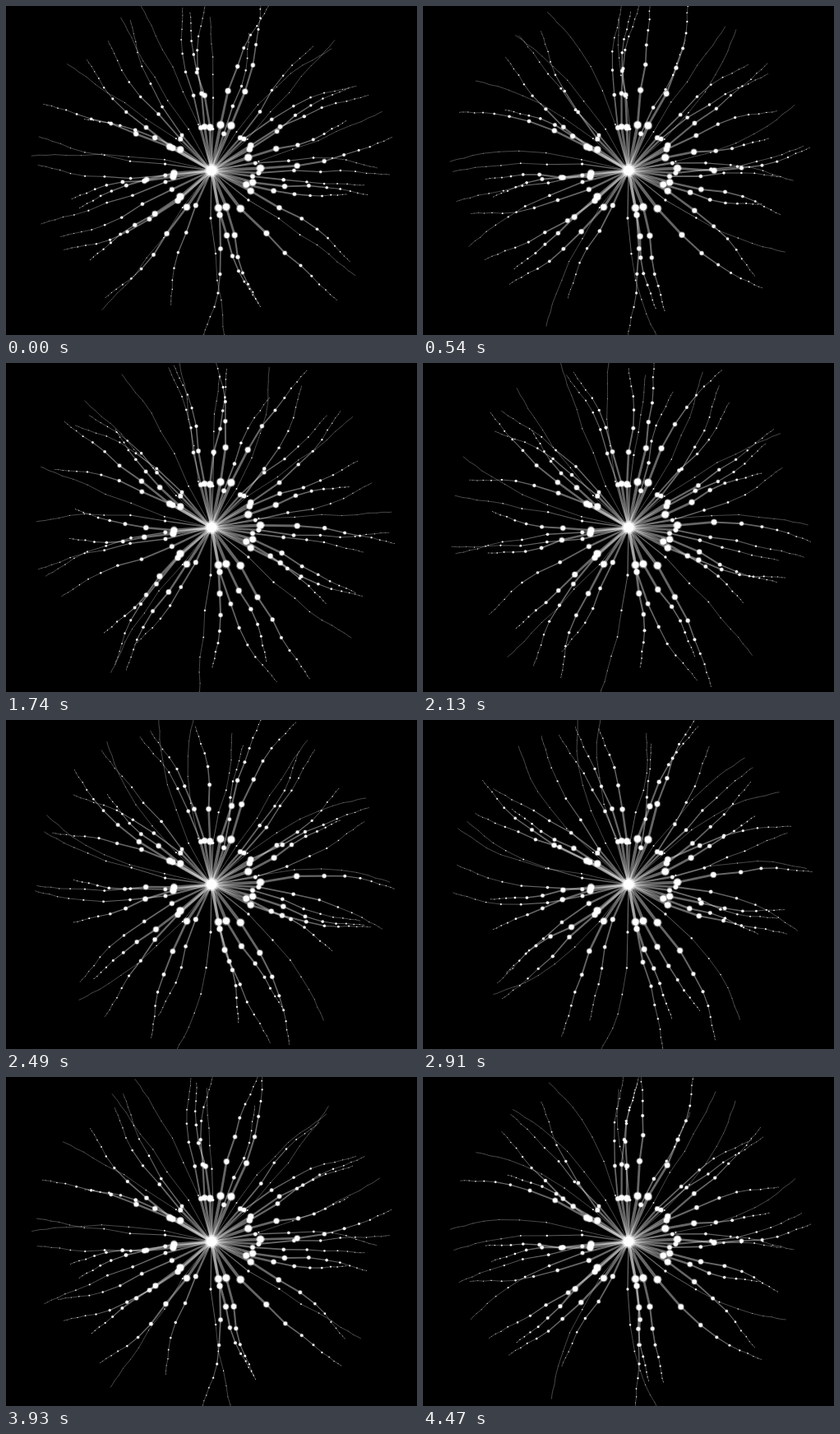
An HTML page with a canvas for the animation above (4500 ms loop, 500 px wide and 400 px high).

```html
<!DOCTYPE html>
<html>
<head>
<meta charset="utf-8">
<style>
  html, body { margin: 0; width: 100%; height: 100%; overflow: hidden; background: #000; }
  canvas { display: block; }
</style>
</head>
<body>
<canvas id="stage" width="500" height="400"></canvas>
<script>
const ctx = document.getElementById('stage').getContext('2d');
const LOOP = 4500, STEP = 30, SHRINK = 0.75, SWAY = 0.16, PHASE = -3.2;

// Strands grouped by root size: direction in degrees, first segment length.
// The length also sets the phase of the sway.
const groups = [
  { size: 5, strands: [[-66.4, 59.6], [-78.7, 56.5], [68, 47.8], [79.5, 46.4], [52.7, 58.2],
    [140, 49.6], [-2.6, 59.6], [-19.4, 47.4]] },
  { size: 4.5, strands: [[-92, 52.5], [22, 45.6], [16, 52.2], [171, 47.2], [176, 45.7],
    [209.6, 58.5], [214, 45.6], [124, 53.8], [27.5, 53.8]] },
  { size: 4, strands: [[-99, 53.9], [-29, 53], [-32.5, 56.6], [138, 55], [79.5, 54.9], [210, 54.5]] },
  { size: 3.2, strands: [[-71.4, 47.1], [-48.7, 53], [-44.2, 55.1], [3, 57.5], [8, 50.5],
    [114.3, 46.6], [154.4, 53.4], [225.5, 53.8], [-104, 53.6]] },
  { size: 2.6, strands: [[-9.5, 54.1], [166, 57.7], [174, 56.5], [230, 56]] },
  { size: 1.7, strands: [[38.7, 57.6], [91, 58], [188, 57], [-88, 50.5]] },
  { size: 1, strands: [[193, 58.6], [222, 58], [241, 57.5], [254, 58.3], [-57, 56],
    [-41, 58], [-11, 58.5], [128, 57.3]] }
];

function dot(x, y, r) {
  for (const [scale, alpha] of [[1.08, 0.4], [0.82, 1]]) {
    ctx.fillStyle = `rgba(255,255,255,${alpha})`;
    ctx.beginPath();
    ctx.arc(x, y, r * scale, 0, 2 * Math.PI);
    ctx.fill();
  }
}

function strand(angle, length, size, time) {
  let x = 250, y = 200;
  while (length > 4) {
    const nextX = x + length * Math.cos(angle);
    const nextY = y + length * Math.sin(angle);
    ctx.lineWidth = Math.max(0.7, size * 0.75);
    ctx.beginPath();
    ctx.moveTo(x, y);
    ctx.lineTo(nextX, nextY);
    ctx.stroke();
    dot(nextX, nextY, size);
    x = nextX;
    y = nextY;
    angle += SWAY * Math.sin(time + length + PHASE);
    length *= SHRINK;
    size *= SHRINK;
  }
}

function draw(now) {
  const time = Math.floor(now % LOOP / STEP) * STEP / 600;
  ctx.fillStyle = '#000';
  ctx.fillRect(0, 0, 500, 400);
  ctx.strokeStyle = 'rgba(255,255,255,0.4)';
  for (const { size, strands } of groups) {
    for (const [degrees, length] of strands) {
      strand(degrees * Math.PI / 180, length, size, time);
    }
  }
  dot(250, 200, 7.8);
}

const start = performance.now();
function tick() {
  draw(performance.now() - start);
  requestAnimationFrame(tick);
}
tick();
</script>
</body>
</html>
```
